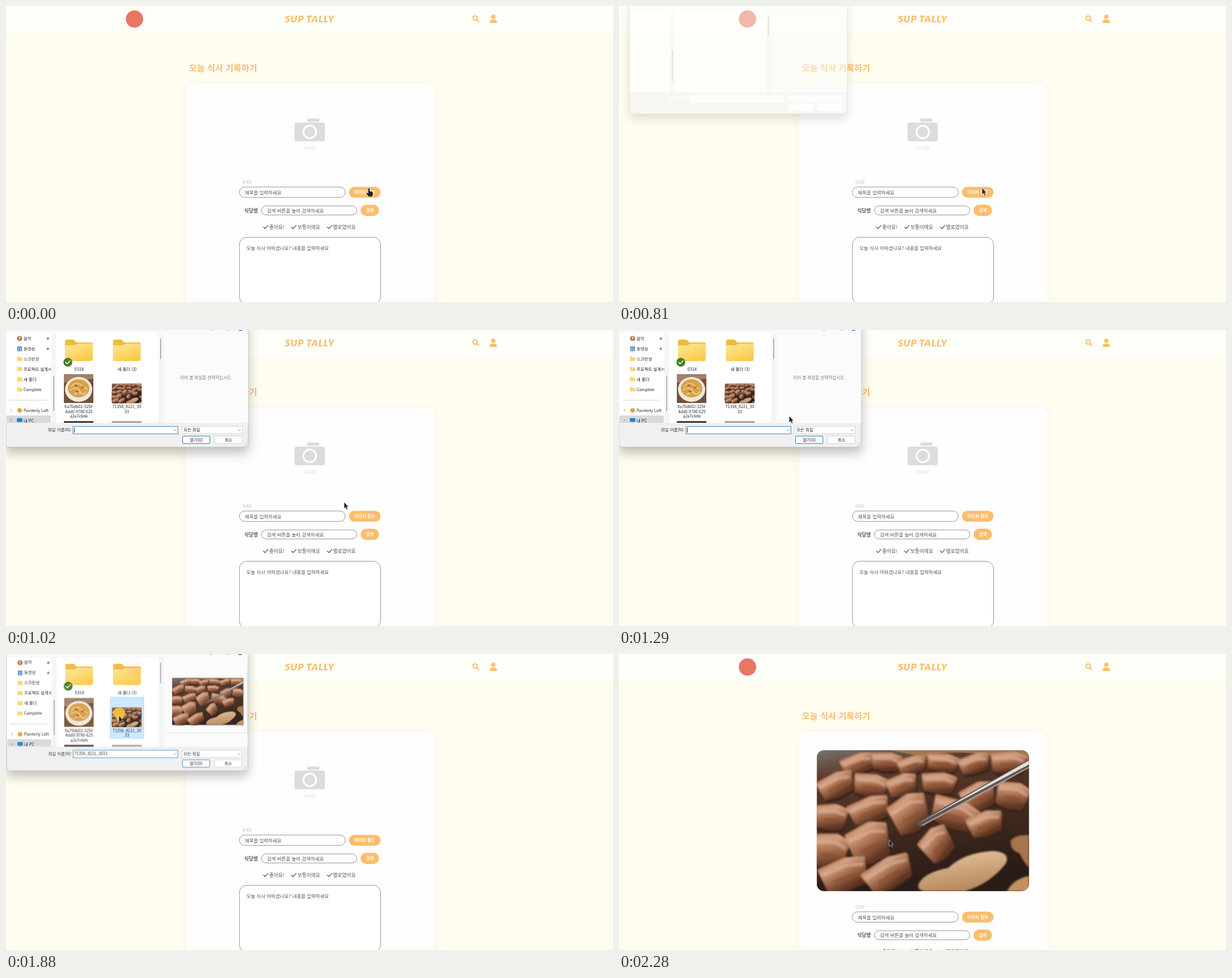
An HTML page that plays this animation: 1070 px wide and 523 px high, repeating every 2350 ms.

```html
<!DOCTYPE html>
<html lang="ko">
<head>
<meta charset="utf-8">
<title>오늘 식사 기록하기</title>
<style>
html, body { margin: 0; width: 100%; height: 100%; overflow: hidden; background: #fffcf0; }
svg.stage { display: block; width: 100%; height: 100%; }
text { font-family: "Noto Sans CJK KR", "Noto Sans CJK", sans-serif; }
.mid { text-anchor: middle; }
.form text { font-size: 8.45px; fill: #555; }
.form .label { font-size: 8.7px; }
.form .button { font-size: 7.5px; font-weight: 700; fill: #fff; text-anchor: middle; }
.box { fill: #fff; stroke: #777; stroke-width: .8; }
.orange { fill: #fdbd6b; }
.dialog text { font-size: 7.4px; fill: #222; }
.dialog .latin { font-size: 7px; }
.line { fill: none; stroke-linecap: round; stroke-linejoin: round; }

.anim { animation: 2350ms step-end infinite; }
.form { animation-name: form; }
.empty { animation-name: empty; }
.photo { animation-name: photo; }
.dialog { animation-name: dialog; }
.details { animation-name: details; }
.caret { animation-name: caret; }
.hover { animation-name: hover; }
.picked { animation-name: picked; }
.flash { animation-name: flash; }
.cursor { animation-name: cursor; }
.hand { animation-name: hand; }
.arrow { animation-name: arrow; }

@keyframes form { 0% { transform: none } 82.97%, 100% { transform: translateY(135.7px) } }
@keyframes empty { 0% { opacity: 1 } 82.97%, 100% { opacity: 0 } }
@keyframes photo { 0% { opacity: 0 } 82.97%, 100% { opacity: 1 } }
@keyframes dialog {
  0% { opacity: 0; transform: none }
  34.46% { opacity: .47; transform: translate(18.5px, 5px) scale(.898) }
  37.44% { opacity: .92; transform: translate(4px, 1px) scale(.98) }
  40.42% { opacity: 1; transform: none }
  80% { opacity: .95; transform: translate(1px, .2px) scale(.996) }
  82.97% { opacity: .47; transform: translate(7px, 2.2px) scale(.9625) }
  85.53%, 100% { opacity: 0; transform: none }
}
@keyframes details { 0% { opacity: 0 } 37.44%, 100% { opacity: 1 } }
@keyframes caret { 0% { opacity: 0 } 40.42% { opacity: 1 } 62.97%, 100% { opacity: 0 } }
@keyframes hover { 0% { opacity: 0 } 60% { opacity: 1 } 74.46%, 100% { opacity: 0 } }
@keyframes picked { 0% { opacity: 0 } 74.46%, 100% { opacity: 1 } }
@keyframes flash { 0% { opacity: 0 } 80% { opacity: 1 } 82.97%, 100% { opacity: 0 } }
@keyframes hand { 0% { opacity: 1 } 26.38% { opacity: 0 } 82.97% { opacity: 1 } 85.53%, 100% { opacity: 0 } }
@keyframes arrow { 0% { opacity: 0 } 26.38% { opacity: 1 } 82.97% { opacity: 0 } 85.53%, 100% { opacity: 1 } }
@keyframes cursor {
  0% { transform: translate(640px, 321.5px) }
  40.42% { transform: translate(628px, 317px) }
  43.4% { transform: translate(596px, 304px) }
  45.95% { transform: translate(530px, 270px) }
  48.93% { transform: translate(450px, 228px) }
  51.48% { transform: translate(370px, 188px) }
  54.46% { transform: translate(300px, 152px) }
  57.44% { transform: translate(250px, 130px) }
  60% { transform: translate(222px, 118px) }
  65.53% { transform: translate(206px, 112px) }
  68.51% { transform: translate(200px, 110px) }
  71.48% { transform: translate(199px, 109px) }
  82.97% { transform: translate(200px, 110px) }
  85.53% { transform: translate(218px, 118px) }
  88.51% { transform: translate(268px, 156px) }
  91.48% { transform: translate(345px, 217px) }
  94.04% { transform: translate(430px, 288px) }
  97.02%, 100% { transform: translate(476px, 328px) }
}
</style>
</head>
<body>
<svg class="stage" viewBox="0 0 1070 523" preserveAspectRatio="none">
<defs>
  <linearGradient id="pan" x2=".25" y2="1">
    <stop stop-color="#77726d"/><stop offset=".2" stop-color="#5a3a29"/><stop offset="1" stop-color="#2a1c16"/>
  </linearGradient>
  <linearGradient id="meat" x2=".4" y2="1">
    <stop stop-color="#b2683e"/><stop offset=".25" stop-color="#d3a285"/>
    <stop offset=".6" stop-color="#a66c4c"/><stop offset="1" stop-color="#5f3421"/>
  </linearGradient>
  <linearGradient id="mushroom" x2=".3" y2="1"><stop stop-color="#e6c8a2"/><stop offset="1" stop-color="#b98a5e"/></linearGradient>
  <linearGradient id="folderFront" x2=".6" y2="1"><stop stop-color="#ffe79a"/><stop offset="1" stop-color="#fbcb4b"/></linearGradient>
  <clipPath id="photoClip"><rect x="348.500" y="170" width="374.500" height="249" rx="13"/></clipPath>
  <clipPath id="sideClip"><rect x="1" y="0" width="78.500" height="164"/></clipPath>
  <clipPath id="listClip"><rect x="0" y="0" width="427" height="164"/></clipPath>
  <filter id="soft"><feGaussianBlur stdDeviation="1.8"/></filter>

  <symbol id="dish" viewBox="0 0 375 249" preserveAspectRatio="none">
    <rect width="375" height="249" fill="url(#pan)"/>
    <path d="M130 0H375V22Q250 -8 190 12Z" fill="#a2764f"/>
    <g filter="url(#soft)">
      <g id="pieces"></g>
      <path d="M180 236Q190 216 232 208Q262 180 312 178Q342 180 334 200Q306 236 262 249H190Q176 247 180 236Z" fill="url(#mushroom)"/>
      <path d="M342 160Q352 148 375 150V208Q364 196 358 182Q342 178 342 160Z" fill="#a4744f"/>
      <path d="M336 249Q346 228 375 222V249Z" fill="#c3905f"/>
    </g>
    <path d="M375 17L178 127Q174 133 183 135L375 31Z" fill="#5d5551"/>
    <path d="M375 18L180 129L375 25Z" fill="#e5e0dc"/>
    <path d="M186 133L375 30" stroke="#aaa19b" stroke-width="2"/>
  </symbol>

  <symbol id="folder" viewBox="0 0 49 40">
    <path d="M0 4Q0 1 3 1H15L20 6H46Q49 6 49 9V36H0Z" fill="#f0b93f"/>
    <path d="M0 14Q0 11 3 11H17L22 8H46Q49 8 49 11V36Q49 39 46 39H3Q0 39 0 36Z" fill="url(#folderFront)"/>
  </symbol>
  <path id="check" class="line" d="M0 4L2.700 6.800L8 1.200"/>
  <path id="chevron" class="line" d="M0 0L2 2L4 0" stroke="#666" stroke-width=".8"/>
  <path id="pin" d="M2 0L5 3L3.500 3.500L2 5L0 3L1.500 1.500ZM1 4L0 5" fill="#888" stroke="#888" stroke-width=".5"/>
</defs>

<rect width="1070" height="523" fill="#fffcf0"/>
<rect width="1070" height="48" fill="#fffff9"/>
<circle cx="226.500" cy="23" r="15.300" fill="#e77662"/>
<text class="mid orange" x="535.500" y="29" style="font: italic 900 17px Lato, sans-serif; letter-spacing: .9px">SUP TALLY</text>
<g fill="none" stroke="#fdbd6b" stroke-width="2.200" stroke-linecap="round">
  <circle cx="827" cy="21.300" r="3.800"/><path d="M830 24.300L833 27.200"/>
</g>
<g class="orange"><circle cx="859" cy="19" r="3.800"/><path d="M852.500 30Q852.500 24 857 24H861Q865.500 24 865.500 30Z"/></g>

<text class="orange" x="322.500" y="115.300" font-size="15.200" font-weight="700">오늘 식사 기록하기</text>
<rect x="318" y="138" width="437" height="420" rx="13" fill="#fefefe" style="filter: drop-shadow(0 2px 8px rgba(90, 70, 20, .04))"/>

<g class="anim empty">
  <g fill="#dcdcdc">
    <rect x="531" y="198.500" width="21.500" height="6" rx="2"/>
    <rect x="508.500" y="206" width="53.500" height="33" rx="4"/>
    <circle cx="535.500" cy="222.500" r="11.200" stroke="#fff" stroke-width="3.200"/>
  </g>
  <text class="mid" x="536" y="252.500" font-size="8" fill="#dcdcdc">Image</text>
</g>
<g class="anim photo" clip-path="url(#photoClip)"><use href="#dish" x="348.500" y="170" width="374.500" height="249"/></g>

<g class="anim form">
  <text x="417" y="314" style="font-size: 7.6px; fill: #bbb">0/60</text>
  <rect class="box" x="411.400" y="319.900" width="186.700" height="18.300" rx="9.150"/>
  <text x="421" y="332.900">제목을 입력하세요</text>
  <rect class="orange" x="604.500" y="319.500" width="55.700" height="19.300" rx="9.600"/>
  <text class="button" x="632.300" y="332">이미지 첨부</text>
  <text class="label" x="420" y="364.600" font-weight="700">식당명</text>
  <rect class="box" x="450.400" y="353.200" width="168" height="16" rx="8"/>
  <text x="460" y="364.600">검색 버튼을 눌러 검색하세요</text>
  <rect class="orange" x="625" y="351" width="32.500" height="20" rx="10"/>
  <text class="button" x="641.300" y="364">검색</text>
  <g stroke="#444" stroke-width="1.150">
    <use href="#check" x="454" y="386.500"/><use href="#check" x="503.500" y="386.500"/><use href="#check" x="566.500" y="386.500"/>
  </g>
  <text class="label" x="464" y="393.700">좋아요!</text>
  <text class="label" x="513.700" y="393.700">보통이에요</text>
  <text class="label" x="576.500" y="393.700">별로였어요</text>
  <rect class="box" x="411.400" y="408.600" width="249" height="118" rx="13"/>
  <text x="423.700" y="431.200">오늘 식사 어떠셨나요? 내용을 입력하세요</text>
</g>

<g class="anim dialog">
  <path d="M0 -20H427V202Q427 207 422 207H5Q0 207 0 202Z" fill="#f0f0f0" stroke="#aaa" stroke-width=".6" style="filter: drop-shadow(0 10px 10px rgba(0, 0, 0, .26))"/>
  <path d="M0 -20H427V6H0Z" fill="#f8f9fb"/>
  <path d="M.4 6H426.600V164H.4Z" fill="#f5f5f5"/>
  <path d="M.4 6H80V164H.4ZM88.500 6H268.500V164H88.500Z" fill="#fff"/>
  <path d="M278 6H426.600V164H278Z" fill="#fbfbfb"/>
  <g fill="#fff"><rect x="74" y="172" width="42" height="9" opacity=".4"/><rect x="118" y="170" width="185" height="14"/><rect x="310" y="170" width="107" height="13"/><rect x="311" y="187" width="49" height="14"/><rect x="368" y="187" width="49" height="14"/></g>
  <g class="line" stroke="#8a8a8a" stroke-width="1.200"><path d="M84.200 81.500V143M272.700 15.500V51"/></g>

  <g class="anim details">
    <path d="M359 0H364M390 0H395" stroke="#777" stroke-width=".8"/>
    <circle cx="413.500" cy="-3" r="4.500" fill="#1675c4"/>

    <g clip-path="url(#sideClip)">
      <rect x="1" y="151" width="78" height="14" fill="#d9d9d9"/>
      <circle cx="24" cy="15" r="4.600" fill="#b5774f"/><path d="M23.500 17V12.500L26 13.500" class="line" stroke="#fff"/>
      <rect x="20" y="29" width="8" height="8.500" rx="1" fill="#4d88be"/><path d="M22.500 30V37M25.500 30V37" stroke="#d8eaff"/>
      <use href="#folder" x="19.500" y="47" width="9" height="8"/><use href="#folder" x="19.500" y="65" width="9" height="8"/>
      <use href="#folder" x="19.500" y="83" width="9" height="8"/><use href="#folder" x="19.500" y="101" width="9" height="8"/>
      <circle cx="24" cy="142" r="4" fill="#e8a23c"/>
      <path d="M19.500 156H28.500V162H19.500ZM22 163H26" fill="#1985d1" stroke="#1985d1" stroke-width=".5"/>
      <path d="M8.500 140L10.500 142L8.500 144M8.500 158L10.500 160L8.500 162" class="line" stroke="#777" stroke-width=".8"/>
      <path d="M6 124H74" stroke="#d2d2d2"/>
      <use href="#pin" x="71.500" y="12.500"/><use href="#pin" x="71.500" y="30.500"/>
      <text x="31" y="17.500">음악</text><text x="31" y="35.500">동영상</text><text x="31" y="53.500">스크린샷</text>
      <text x="31" y="71.500">프로젝트 설계서</text><text x="31" y="89.500">새 폴더</text>
      <text class="latin" x="31" y="107.700">Complete</text><text class="latin" x="31" y="144.500">Painterly Loft</text>
      <text x="31" y="162.500">내 PC</text>
    </g>

    <g clip-path="url(#listClip)">
      <rect class="anim hover" x="183" y="76" width="60" height="74" fill="#e5f3ff"/>
      <rect class="anim picked" x="183.400" y="76.400" width="59.200" height="73" fill="#cce8ff" stroke="#99d1ff" stroke-width=".8"/>
      <use href="#folder" x="104" y="16" width="49" height="40"/>
      <use href="#folder" x="188.500" y="16" width="49" height="40"/>
      <circle cx="109" cy="57" r="7.800" fill="#447d29"/><use href="#check" x="105" y="53" stroke="#fff" stroke-width="1.500"/>
      <rect x="102" y="78" width="52" height="51" fill="#765139"/>
      <path d="M102 78H154V86L102 93Z" fill="#a08067"/>
      <ellipse cx="128" cy="105" rx="24" ry="22" fill="#efe8dc"/>
      <ellipse cx="128" cy="103" rx="19" ry="16" fill="#d7a14b"/>
      <g class="line" stroke="#f0cc83" stroke-width="1.800"><path d="M115 100Q123 90 132 97T143 104M113 106Q125 98 130 108T142 109M120 114Q128 107 137 114"/></g>
      <path d="M121 97L126 100M132 103L137 100M123 108L128 110" stroke="#a55632" stroke-width="2"/>
      <use href="#dish" x="186.500" y="94.500" width="52.500" height="35"/>
      <path d="M102 161H154V165H102Z" fill="#46362f"/><path d="M186.500 161H239V165H186.500Z" fill="#aaa098"/>
      <text class="mid" x="129" y="71.500">0314</text><text class="mid" x="213.500" y="71.500">새 폴더 (3)</text>
      <g class="mid">
        <text class="latin" x="128.500" y="138">8a70db02-325f-</text><text class="latin" x="128.500" y="146.500">4dd0-9780-625</text><text class="latin" x="128.500" y="155">a2e7cfefe</text>
        <text class="latin" x="213" y="138">71358_8221_30</text><text class="latin" x="213" y="146.500">33</text>
      </g>
      <text class="mid" x="353" y="87.300" style="fill: #777; font-size: 7.5px">미리 볼 파일을 선택하십시오.</text>
    </g>

    <text x="74" y="179.300">파일 이름(N):</text>
    <rect x="118" y="170.400" width="185" height="13.200" fill="#fff" stroke="#2b7dbd" stroke-width=".9"/>
    <rect x="310.500" y="170.400" width="106" height="12.800" fill="#fff" stroke="#ccc" stroke-width=".8"/>
    <rect x="311.400" y="187.400" width="48" height="13.200" rx="1.500" fill="#fdfdfd" stroke="#2b7dbd"/>
    <rect x="368" y="187.400" width="48.500" height="13.200" rx="1.500" fill="#fdfdfd" stroke="#ccc" stroke-width=".8"/>
    <use href="#chevron" x="296" y="176"/><use href="#chevron" x="409.500" y="176"/>
    <text x="313" y="179.300">모든 파일</text>
    <text class="mid" x="335.500" y="196.500" style="font-size: 7.1px">열기(O)</text><text class="mid" x="392.300" y="196.500" style="font-size: 7.1px">취소</text>
    <path d="M418 206L425 199M421.500 206L425 202.500" stroke="#bbb" stroke-width=".8"/>
    <path class="anim caret" d="M120.500 172.500V181.500" stroke="#111" stroke-width=".9"/>

    <g class="anim picked">
      <rect x="279" y="30" width="147" height="110" fill="#fbfbfb"/>
      <rect x="294" y="43" width="126" height="84" fill="#bbb" opacity=".7"/>
      <use href="#dish" x="293" y="42" width="126" height="83.500"/>
      <text class="latin" x="120" y="179">71358_8221_3033</text>
    </g>
  </g>
</g>

<path class="anim flash" d="M187 104Q190 96 199 95Q210 96 210 105Q207 117 197 119Q194 112 187 104Z" fill="#f0bd37" opacity=".9"/>
<g class="anim cursor" fill="#1d222b" stroke="#fff" stroke-width=".5">
  <path class="anim hand" d="M-1.800 1.500Q-.3 -.8 1.200 1.500V5.500L5.500 6.500Q7.400 7.300 7 10L5.500 15.500H-.5L-5 10Q-5.300 7.600 -3.500 8.300L-1.800 9.500Z"/>
  <path class="anim arrow" d="M0 0V11.500L2.600 9.300L4.500 13.300L6.400 12.400L4.600 8.500H7.800Z"/>
</g>
</svg>
<script>
// Centre x, centre y, width, height and tilt of each piece, back to front.
const pieces = [
  [72, 24, 62, 38, -12], [122, 20, 56, 36, 10], [168, 26, 54, 34, -8], [222, 22, 60, 36, 12],
  [278, 24, 58, 38, -10], [338, 22, 66, 42, 6], [34, 62, 68, 46, -18], [95, 62, 64, 44, 14],
  [150, 62, 56, 42, -10], [215, 58, 64, 40, 8], [345, 80, 62, 52, 18], [25, 118, 60, 50, 10],
  [92, 106, 76, 48, -14], [285, 82, 64, 52, -16], [242, 112, 86, 56, 24], [297, 130, 66, 46, -12],
  [164, 112, 72, 70, -20], [212, 166, 60, 60, -34], [22, 178, 66, 68, 16],
  [92, 164, 78, 74, -14], [48, 220, 88, 60, -14], [126, 218, 92, 56, -24]
];

function piece([x, y, w, h, tilt]) {
  const l = -w / 2 + 4, r = w / 2 - 4, t = -h / 2 + 4, b = h / 2 - 4;
  const outline = `M${l} ${t + h * .15}L${w * .1} ${t}L${r} ${t + h * .1}L${r - w * .08} ${b - h * .12}L${-w * .05} ${b}L${l + w * .1} ${b - h * .05}Z`;
  return `<g transform="translate(${x} ${y}) rotate(${tilt})" stroke-linejoin="round" stroke-width="7">
    <path d="${outline}" transform="translate(1 4)" fill="#35201a" stroke="#35201a"/>
    <path d="${outline}" fill="url(#meat)" stroke="url(#meat)"/>
    <path d="M${l + 5} ${t + h * .3}L${w * .12} ${t + h * .18}L${r - 5} ${t + h * .26}" class="line" stroke="#dcb79f" stroke-width="6" opacity=".55"/>
    <path d="M${l + w * .25} ${b - h * .3}L${r - w * .25} ${b - h * .38}" class="line" stroke="#8a4627" stroke-width="5" opacity=".5"/>
  </g>`;
}

document.getElementById("pieces").innerHTML = pieces.map(piece).join("");
</script>
</body>
</html>
```
